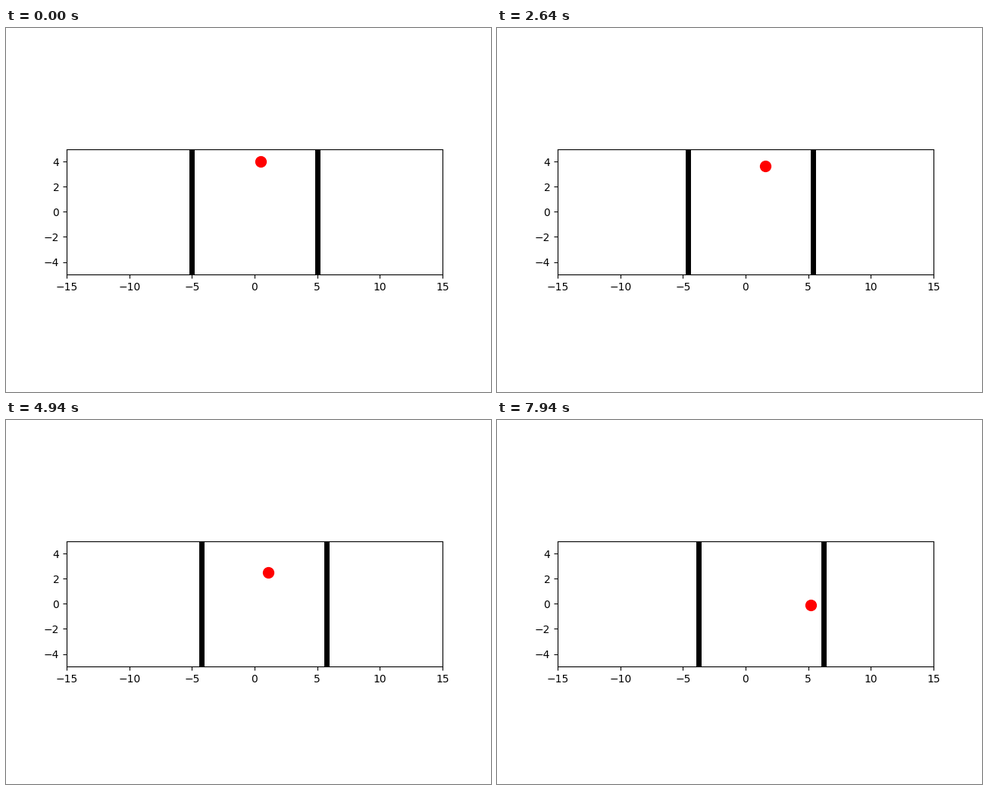
Recreate the animation shown at these times as a matplotlib script. Size 640x480 px, loop 8 s.

```python
import matplotlib.pyplot as plt
from matplotlib.animation import FuncAnimation

TICK = 20        # ms per frame
FRAMES = 400
STEPS = 122      # simulation states shown in one loop
WALL_SPEED = 0.01
KICK = 0.1       # velocity gained at every bounce
REACH = 1.0      # distance to a wall at which the ball turns


def walls(step):
    shift = WALL_SPEED * step
    return -5 + shift, 5 + shift


def height(step):
    return 4.029 - 0.000303 * (step - 5.2) ** 2


def simulate(count):
    """Ball positions for steps 1..count."""
    x, v, path = 0.0, 0.5, []
    for step in range(1, count + 1):
        x += v
        left, right = walls(step)
        if (v > 0 and right - x < REACH) or (v < 0 and x - left < REACH):
            v = KICK - v
        path.append((x, height(step)))
    return path


def change_time(k):
    """Time of the k-th change: waits of 20 and 100 ms, four long in seven."""
    return 20 * k + 80 * ((8 * k + 7) // 14)


path = simulate(STEPS)
times = [change_time(k) for k in range(1, STEPS)]

fig, ax = plt.subplots(figsize=(6.4, 4.8), dpi=100)
ax.set_aspect("equal")
ax.set_xlim(-15, 15)
ax.set_ylim(-5, 5)
ax.set_xticks(range(-15, 16, 5))
ax.set_yticks(range(-4, 5, 2))

bars = [ax.plot([x, x], [-5, 5], "k", lw=5)[0] for x in walls(1)]
ball, = ax.plot([], [], "ro", ms=10)


def draw(frame):
    k = sum(t <= frame * TICK for t in times)
    for bar, x in zip(bars, walls(k + 1)):
        bar.set_xdata([x, x])
    x, y = path[k]
    ball.set_data([x], [y])
    return [*bars, ball]


anim = FuncAnimation(fig, draw, frames=FRAMES, interval=TICK,
                     init_func=lambda: draw(0), repeat=True, repeat_delay=0)
plt.show()
```
